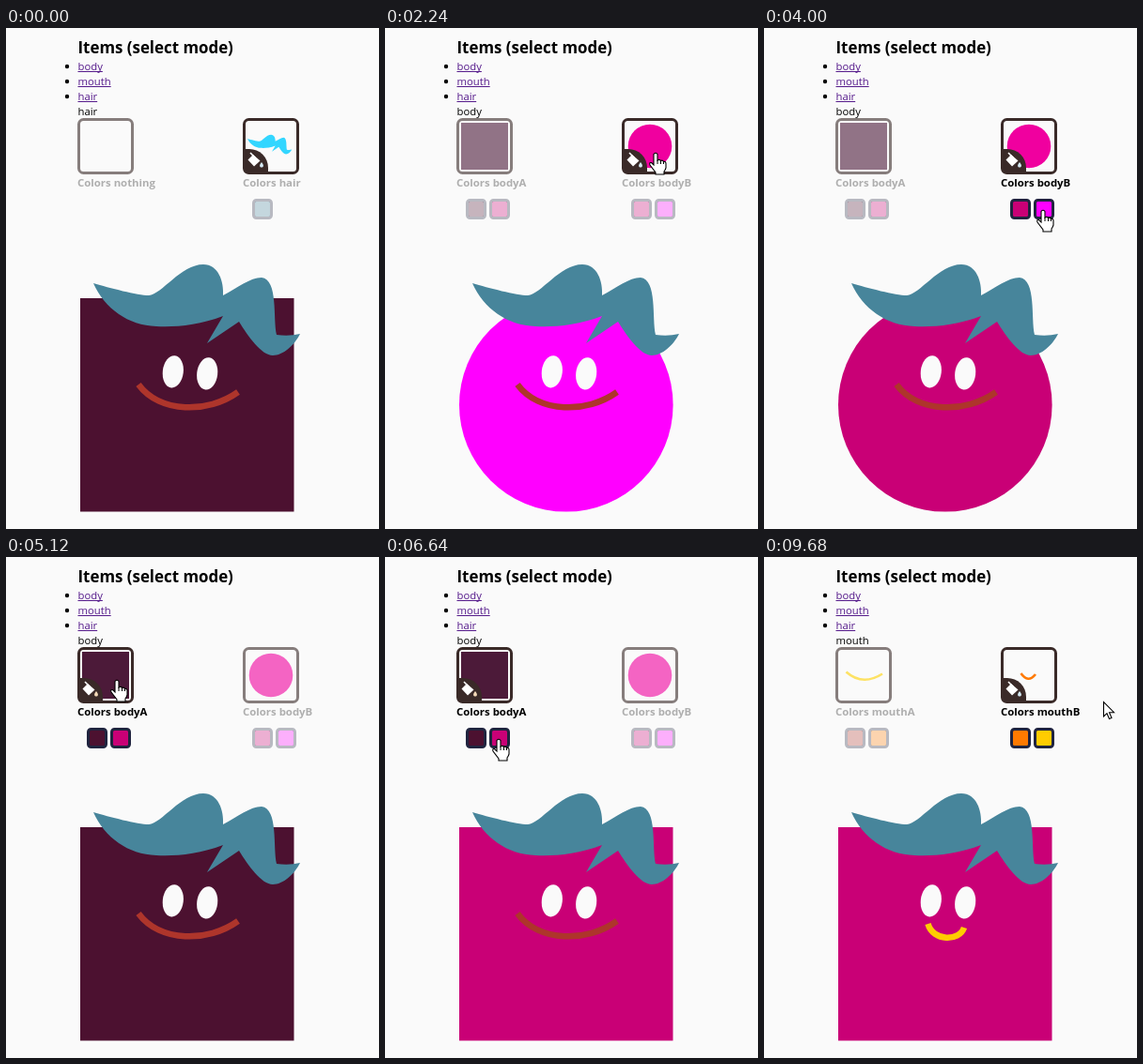
Animation of 397 by 534 pixels, one loop 9.76 s. Source, as an HTML page with a canvas:

```html
<!DOCTYPE html>
<html lang="en">
<head>
<meta charset="utf-8">
<title>Character editor</title>
<style>
html, body { margin: 0; width: 100%; height: 100%; overflow: hidden; background: #fafafa; }
canvas { display: block; }
</style>
</head>
<body>
<canvas id="stage" width="397" height="534"></canvas>
<script>
const ctx = document.getElementById('stage').getContext('2d');
const LOOP = 9760, STEP = 80;
const FONT = '"Open Sans", "Noto Sans", sans-serif';
const BG = '#fafafa', FRAME = '#3a2a28', TEAL = '#47859b';
const PINK = '#c90076', ORANGE = '#ff7a00';
const COLUMNS = [76, 252];
const LINKS = ['body', 'mouth', 'hair'];

const ITEMS = {
  hair: { names: ['nothing', 'hair'], colors: [[], [TEAL]] },
  mouth: { names: ['mouthA', 'mouthB'], colors: [['#ae352b', ORANGE], [ORANGE, '#ffcc00']] },
  body: { names: ['bodyA', 'bodyB'], colors: [['#4c1130', PINK], [PINK, '#ff00ff']] }
};

const hair = new Path2D('M93 272C110 277 140 285 152 285C166 284 186 252 210 252C226 252 232 270 231 285C246 277 260 266 272 266C290 268 284 310 288 327Q301 329 313 326C307 338 295 349 284 349C272 349 258 329 248 313L214 336L231 307C205 317 180 319 160 318C130 317 105 299 93 272Z');
const mouths = ['M141 380C164 411 215 411 247 388', 'M174.500 391C180 410 208 410 213 395'].map(d => new Path2D(d));
const thumbMouths = ['M87.500 122.500Q105 138 126 124.500', 'M273.500 124Q281 135 289 125'].map(d => new Path2D(d));
const hand = new Path2D('M-2 1.500Q0-1 2 1.500V8Q4 6.500 5.500 8.500Q7.500 7.500 8.500 9.500Q11 9 11 11.500V16Q10.500 18 9 20V23H0V21L-6 13Q-7 10-4.500 10.500L-2 13Z');
const arrow = new Path2D('M.5.5V16L4 12.700L6.500 18.500L9 17.400L6.500 11.700H11.500Z');

// Places the pointer goes to, and what a click there does.
const link = item => ({
  x: 93, y: 42 + 11 * LINKS.indexOf(item),
  press: s => { s.item = item; }
});
const thumb = (side, dx, dy) => ({
  x: COLUMNS[side] + dx, y: 96 + dy,
  press: s => { s.shown[s.item] = side; }
});
const icon = side => ({
  x: COLUMNS[side] + 17, y: 139,
  press: s => { s.picking = !s.picking; }
});
const swatch = (side, i) => ({
  x: COLUMNS[side] + 20 + 25 * i, y: 194,
  press: s => { s.picked[s.item][side] = i; }
});

const move = (start, end, to, click = Infinity, bend = 0) => ({ start, end, to, click, bend });
const entry = { x: 338, y: 70 }, exit = { x: 361, y: 154 };
const moves = [
  move(80, 560, link('mouth'), 720, -.1),
  move(640, 1040, link('body'), 1360),
  move(1520, 2080, thumb(1, 36, 37), 2240),
  move(2400, 2640, swatch(1, 0)),
  move(2640, 2880, icon(1), 3120),
  move(3040, 3600, swatch(1, 0), 3760),
  move(3680, 4000, swatch(1, 1), 4320),
  move(4400, 4960, thumb(0, 42, 35), 5040),
  move(5120, 5440, icon(0), 5680),
  move(5600, 6080, icon(0), 6240),
  move(6160, 6480, swatch(0, 1), 6640),
  move(6800, 7680, link('mouth'), 7840, -.6),
  move(7760, 8240, thumb(1, 17, 29), 8400),
  move(8480, 9120, swatch(1, 1)),
  move(9360, 9680, exit)
];

function stateAt(t) {
  const state = {
    item: 'hair', picking: false,
    shown: { hair: 1, mouth: 0, body: 0 },
    picked: { mouth: [0, 1], body: [0, 1] }
  };
  for (const m of moves) if (m.click <= t) m.to.press(state);
  return state;
}

function pointerAt(t) {
  let from = entry, pos = entry;
  for (const { start, end, to, bend } of moves) {
    if (t < start) break;
    const u = Math.min(1, (t - start) / (end - start));
    const k = u * u * (3 - 2 * u), swing = bend * Math.sin(Math.PI * k);
    const dx = to.x - from.x, dy = to.y - from.y;
    pos = { x: from.x + dx * k + dy * swing, y: from.y + dy * k - dx * swing };
    from = to;
  }
  return pos;
}

function text(str, x, y, size, weight = 400, color = '#000') {
  ctx.font = `${weight} ${size}px ${FONT}`;
  ctx.fillStyle = color;
  ctx.fillText(str, x, y);
  return ctx.measureText(str).width;
}

function dot(x, y, rx, ry, color, turn = 0) {
  ctx.beginPath();
  ctx.ellipse(x, y, rx, ry, turn, 0, 7);
  ctx.fillStyle = color;
  ctx.fill();
}

function rect(x, y, w, h, color, radius = 0) {
  ctx.beginPath();
  ctx.roundRect(x, y, w, h, radius);
  ctx.fillStyle = color;
  ctx.fill();
}

function box(x, y, size, radius, border, fill) {
  rect(x + 3, y + 3, size - 6, size - 6, fill);
  ctx.beginPath();
  ctx.roundRect(x + 1.5, y + 1.5, size - 3, size - 3, radius);
  ctx.strokeStyle = border;
  ctx.lineWidth = 3;
  ctx.stroke();
}

function line(shape, width, color) {
  ctx.lineWidth = width;
  ctx.strokeStyle = color;
  ctx.stroke(shape);
}

function bucket(x, drop) {
  rect(x + 1, 129, 26, 26, FRAME, [0, 20, 0, 4]);
  ctx.save();
  ctx.translate(x + 12, 140.5);
  ctx.fillStyle = '#fff';
  ctx.fill(new Path2D('M-6.500 0L-1-5.500L6.500 1L0 7Z'));
  line(new Path2D('M-4-7.500L1.500-2'), 1.6, '#fff');
  ctx.fillStyle = drop;
  ctx.fill(new Path2D('M8 2.500C11 6 10 8 8 8S5 6 8 2.500Z'));
  ctx.restore();
}

function thumbnail(item, side) {
  if (item === 'mouth') line(thumbMouths[side], 2.6, side ? ORANGE : '#ffd200');
  else if (item === 'body' && side) dot(282, 126, 23.3, 23.3, '#f0009f');
  else if (item === 'body') rect(81, 101, 50, 50, '#4c1a39');
  else if (side) {
    ctx.save();
    ctx.translate(237, 59.5);
    ctx.scale(.215, .215);
    ctx.fillStyle = '#33d6ff';
    ctx.fill(hair);
    ctx.restore();
  }
}

function drawPanel({ item, shown, picking }) {
  COLUMNS.forEach((x, side) => {
    const active = side === shown[item];
    ctx.globalAlpha = active ? 1 : .6;
    box(x, 96, 60, 5, FRAME, BG);
    thumbnail(item, side);
    if (active) bucket(x, side ? '#d5eaf5' : '#f3d9b8');
    ctx.globalAlpha = active && picking ? 1 : .3;
    text('Colors ' + ITEMS[item].names[side], x, 169, 11.4, 700);
    ITEMS[item].colors[side].forEach((color, i) =>
      box(x + 10 + i * 25, 182, 22, 3, '#20243f', color));
    ctx.globalAlpha = 1;
  });
}

function drawFace({ shown, picked }) {
  const color = item => ITEMS[item].colors[shown[item]][picked[item][shown[item]]];
  if (shown.body) dot(192.8, 401.8, 113.8, 113.8, color('body'));
  else rect(79, 288, 227.5, 227.5, color('body'));
  ctx.fillStyle = TEAL;
  ctx.fill(hair);
  dot(177.8, 366.3, 11, 17.2, BG, .12);
  dot(214.2, 368.4, 11, 17.2, BG, .12);
  line(mouths[shown.mouth], 6.5, color('mouth'));
}

function isClickable(x, y) {
  const inside = (left, top, w, h) => x >= left && x <= left + w && y >= top && y <= top + h;
  return inside(76, 34, 36, 46)
    || COLUMNS.some(c => inside(c, 96, 60, 60) || inside(c + 10, 182, 47, 22));
}

function drawPointer(t) {
  if (t < moves[0].start) return;
  const { x, y } = pointerAt(t), over = isClickable(x, y);
  ctx.save();
  ctx.translate(Math.round(x), Math.round(y));
  ctx.fillStyle = '#fff';
  ctx.fill(over ? hand : arrow);
  line(over ? hand : arrow, 1.1, '#000');
  if (over) line(new Path2D('M2 8V12M5.500 8.500V12M8.500 9.500V12'), 1, '#000');
  ctx.restore();
}

function draw(t) {
  const state = stateAt(t);
  rect(0, 0, 397, 534, BG);
  text('Items (select mode)', 76.5, 27, 16.9, 700);
  LINKS.forEach((name, i) => {
    const y = 45 + i * 16;
    dot(65, y - 4, 2.2, 2.2, '#000');
    const width = text(name, 76.5, y, 11.3, 400, '#551a8b');
    ctx.fillRect(76.5, y + 1, width, 1);
  });
  text(state.item, 76.5, 93, 11.3);
  drawPanel(state);
  drawFace(state);
  drawPointer(t);
}

function tick() {
  const t = performance.now() % LOOP;
  draw(Math.floor(t / STEP) * STEP);
  requestAnimationFrame(tick);
}
tick();
</script>
</body>
</html>
```
